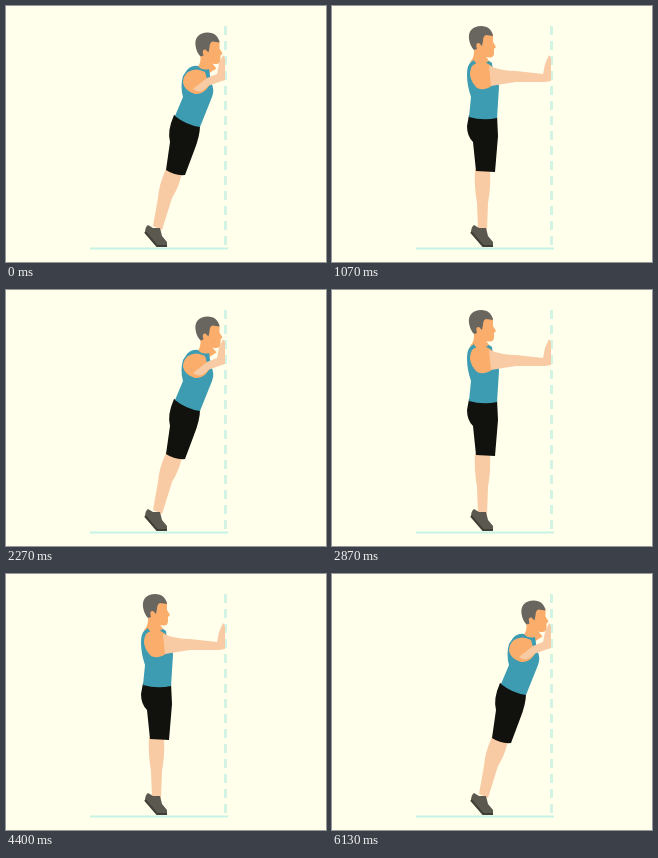
An HTML page for the animation above (6.19 s loop, 320 by 256 pixels).

```html
<!DOCTYPE html>
<html lang="en">
<head>
<meta charset="utf-8">
<title>Wall push-up</title>
<style>
  html, body { margin: 0; width: 100%; height: 100%; overflow: hidden; background: #ffffec; }
  svg { display: block; width: 100%; height: 100%; }
  .hair { fill: #69665f; }
  .face { fill: #fbae6c; }
  .skin { fill: #f8cba4; }
  .top { fill: #3d9cb2; }
  .shorts { fill: #11110d; }
</style>
</head>
<body>
<svg viewBox="0 0 320 256" preserveAspectRatio="none">
  <defs>
    <g id="head">
      <path class="face" d="M142 34V46Q142 52 138 56L147 63L158 56L154 51Q162 53 162 47L162 43L164 41L161 36V28L155 25Z"/>
      <path class="hair" d="M137 33C136 25 141 20 149 20C156 20 160 24 161 30L154 29Q151 30 151 35L150 40L147 37Q143 36 145 43L142 44Q138 40 137 33Z"/>
    </g>
  </defs>

  <path d="M219.5 20V241" fill="none" stroke="#d3f3e4" stroke-width="3" stroke-dasharray="9 6"/>
  <path d="M84 242.5H222" stroke="#c5f3e6" stroke-width="2"/>

  <g id="upright">
    <path class="skin" d="M143 163H158Q159 181 156 197L155 224H146L145 197Q142 180 143 163Z"/>
    <path class="shorts" d="M137 109H165L166 130L163 166L144 165L141 136Q135 130 135 120Z"/>
    <use href="#head"/>
    <path class="top" d="M138 57L142 54Q144 60 150 59L157 55L160 57L161 66Q167 73 167 81L165 112Q151 115 137 111L139 91Q135 79 135 69Q135 60 138 57Z"/>
    <path class="face" d="M141 59Q150 53 158 59L163 63V77Q154 86 145 82Q139 76 138 69Q138 62 141 59Z"/>
    <path class="skin" d="M157 60Q170 65 184 65L211 68L213 58L217 49L219 52V75L213 76L184 76Q170 78 159 80Z"/>
  </g>

  <g id="lean">
    <path class="skin" d="M160 163L176 167Q173 181 166 192L156 224L147 220L152 192Q153 178 160 163Z"/>
    <path class="shorts" d="M168 109L194 120Q194 130 188 145L179 169Q169 170 160 164L164 136Q161 125 168 109Z"/>
    <use href="#head" transform="translate(52.5 6.5)"/>
    <path class="top" d="M181 64Q186 59 192 60Q196 65 203 63L205 76Q209 84 206 91L194 121Q180 119 169 110L177 91Q174 80 177 70Z"/>
    <path class="face" d="M182 66Q190 61 199 66L203 80Q197 89 189 88Q179 85 177 77Q177 70 182 66Z"/>
    <path class="skin" d="M187 83L201 72L211 68L213 58L217 49L219 52V74L213 76L202 80Q195 89 187 83Z"/>
  </g>

  <path fill="#5b594f" d="M142 219L147 222H154L156 230L161 236V241H152L139 227Q139 221 142 219Z"/>
  <path d="M139 226L151 240H161" fill="none" stroke="#3e3d36" stroke-width="2"/>
</svg>
<script>
  const LOOP = 6190, CYCLE = 2000, RISE = 333, HOLD = 1000;
  const upright = document.getElementById('upright');
  const lean = document.getElementById('lean');
  const show = (el, visible) => el.setAttribute('visibility', visible ? 'visible' : 'hidden');

  function draw(time) {
    const phase = (time % LOOP) % CYCLE;
    const isUp = phase >= RISE && phase < RISE + HOLD;
    show(upright, isUp);
    show(lean, !isUp);
  }

  const start = performance.now();
  function tick() {
    draw(performance.now() - start);
    requestAnimationFrame(tick);
  }
  tick();
</script>
</body>
</html>
```
